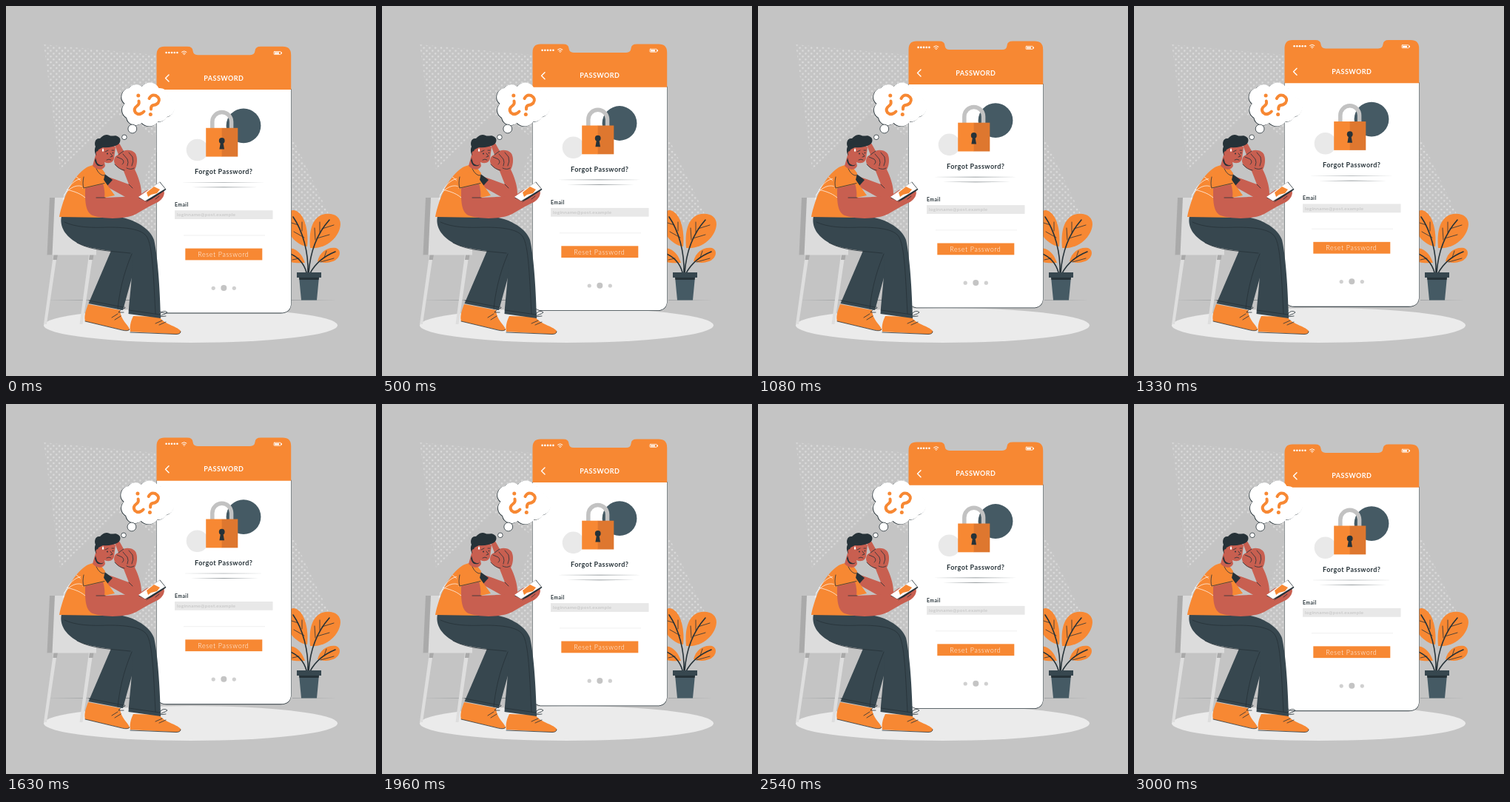
Write an HTML page that moves like this. It is 500 px wide and 500 px high and loops after 3.04 s.

```html
<!DOCTYPE html>
<html lang="en">
<head>
<meta charset="utf-8">
<title>Forgot password</title>
<style>
  html, body { margin: 0; width: 100%; height: 100%; overflow: hidden; background: #c4c4c4; }
  svg { display: block; width: 100vw; height: 100vh; }
  text { font-family: Lato, "Open Sans", sans-serif; letter-spacing: .45px; }
  .bold { font-weight: 700; }
  .orange { fill: #f78833; }
  .white { fill: #fff; }
  .dark { fill: #263238; }
  .slate { fill: #455a64; }
  .pants { fill: #37474f; }
  .skin { fill: #c85f50; }
  .line { fill: none; stroke: #263238; stroke-width: .8; stroke-linecap: round; stroke-linejoin: round; }
  .stem { stroke-width: 1.6; }
  .light { fill: none; stroke: #fff; stroke-width: .7; }
</style>
</head>
<body>
<svg viewBox="0 0 500 500" xmlns="http://www.w3.org/2000/svg">
  <defs>
    <pattern id="dots" width="7.8" height="7.8" patternUnits="userSpaceOnUse">
      <g fill="#dcdcdc"><circle cx="2" cy="2" r="1.3"/><circle cx="5.9" cy="5.9" r="1.3"/></g>
    </pattern>
    <path id="cloud" d="M160 132A12 12 0 0 1 165.500 111A12 12 0 0 1 183 109A13.500 13.500 0 0 1 206 111A11 11 0 0 1 218.500 123A14 14 0 0 1 217 150A12 12 0 0 1 205 156A14 14 0 0 1 183 158A12.500 12.500 0 0 1 162.500 151A12 12 0 0 1 160 132Z"/>
  </defs>

  <rect width="500" height="500" fill="#c4c4c4"/>
  <path fill="url(#dots)" d="M51 52L340 79L437 283L385 302L165 305L205 178L150 146L73 221Z"/>
  <path class="dark" opacity=".7" d="M52 397.500L250 397.100L448 397.500L250 397.900Z"/>
  <ellipse cx="249.5" cy="431.5" rx="198.5" ry="23.5" fill="#ebebeb"/>

  <g id="plant">
    <path class="orange" d="M407 325C395 324 379 310 378 292C378 278 386 273 394 278C405 285 409 307 407 325Z"/>
    <path class="orange" d="M411 327C409 305 413 288 427 282C440 278 452 283 452 295C451 312 433 329 411 327Z"/>
    <path class="orange" d="M421 345C424 332 435 325 446 327C454 330 452 341 442 345C434 348 427 347 421 345Z"/>
    <path class="orange" d="M404 347C397 347 386 349 377 342C371 334 378 325 388 328C396 331 401 338 404 347Z"/>
    <path class="line stem" d="M408 361C409 333 401 304 388 285M409 361C411 332 421 307 437 289M411 361C419 346 430 338 445 332M406 360C402 346 393 338 382 334"/>
    <path class="line" d="M403 313L389 305M400 304L400 292M395 296L386 293M418 316L417 300M424 306L424 292M420 314L437 309M427 301L443 296M425 346L443 341M430 340L433 331M396 341L387 343"/>
    <path class="slate" d="M396 366H423L420 397.500H399Z"/>
    <path class="pants" d="M393 360H426V367H393Z"/>
    <path class="dark" d="M396 367H423L422.500 370H396.500Z"/>
  </g>

  <g id="phone">
    <path class="dark" d="M203.500 112H385.600V401Q385.600 415.400 371 415.400H217Q203.400 415.400 203.400 401Z"/>
    <path class="white" d="M203.800 112H385.200V401Q385.200 414.600 371 414.600H217Q203.800 414.600 203.800 401Z"/>
    <path class="orange" d="M203.500 113V66Q203.500 54.700 214 54.700H245Q252 54.700 252.500 60.500Q253 66.200 259 66.200H330Q336 66.200 336.500 60.500Q337 54.700 344 54.700H374Q385.200 54.700 385.200 66V113Z"/>
    <g id="signal" class="white"></g>
    <g fill="none" stroke="#fff" stroke-linecap="round" stroke-linejoin="round">
      <path stroke-width="1" d="M237.500 62.200Q240.700 59.500 243.900 62.200M239 64Q240.700 62.600 242.400 64"/>
      <rect x="362" y="61.500" width="9.500" height="4" rx=".8" stroke-width=".8"/>
      <path stroke-width="1.400" d="M220 93L215.500 97.500L220 102"/>
    </g>
    <path class="white" d="M363 62.500H369V64.700H363ZM372 62.500H373V64.500H372ZM240 65H241.400V66H240Z"/>
    <text class="bold white" x="267.300" y="100.700" font-size="9">PASSWORD</text>

    <circle class="slate" cx="321" cy="161.800" r="23.400"/>
    <circle cx="258.500" cy="194.500" r="14.800" fill="#e9e9e9"/>
    <path fill="none" stroke="#c2c2c2" stroke-width="5.500" d="M278.800 166V156.500A12.900 12.900 0 0 1 304.600 156.500V166"/>
    <path class="orange" d="M270.200 164.800H292V203.600H270.200Z"/>
    <path fill="#de772f" d="M291.700 164.800H313.300V203.600H291.700Z"/>
    <circle class="dark" cx="291.700" cy="182" r="3.900"/>
    <path class="dark" d="M290.200 183H293.200L295 193.500H288.400Z"/>

    <text class="bold dark" x="255" y="227" font-size="9">Forgot Password?</text>
    <path class="dark" opacity=".65" d="M236 238.200L294 237.900L351 238.200L294 238.500ZM250 244.900L294 244.500L341 244.900L294 245.300Z"/>
    <text class="bold dark" x="228" y="271" font-size="6.800">Email</text>
    <rect x="228" y="276.200" width="132.500" height="11.800" fill="#e8e8e8"/>
    <text x="231" y="284.500" font-size="6.500" fill="#c0c0c0" style="letter-spacing:.3px">loginname@post.example</text>
    <path stroke="#ececec" stroke-width=".8" d="M240 310H350"/>
    <rect class="orange" x="242.300" y="327.600" width="104" height="15.800"/>
    <text class="white" x="259.300" y="338.800" font-size="9" font-weight="300" style="letter-spacing:.6px">Reset Password</text>
    <g fill="#d0d0d0">
      <circle cx="280.200" cy="381.300" r="2.600"/><circle cx="308.300" cy="381.300" r="2.600"/>
      <circle cx="294.300" cy="381.100" r="4" fill="#c4c4c4"/>
    </g>
  </g>

  <g id="thought">
    <use href="#cloud" class="dark" transform="translate(-.8 .5)"/>
    <use href="#cloud" class="white"/>
    <g fill="none" stroke="#f78833" stroke-width="4" stroke-linecap="round" stroke-linejoin="round">
      <path d="M179 128.500Q180 133 176.500 135Q171 139 174.500 144Q180 149 186 142.500"/>
      <path d="M193 125Q196 119 202 121Q209 125 205 131Q202 134 198.500 134Q195 135 195.500 139.500"/>
    </g>
    <circle class="orange" cx="178.300" cy="121" r="2.500"/>
    <circle class="orange" cx="194.800" cy="146.500" r="2.500"/>
    <g class="white" stroke="#263238" stroke-width=".8">
      <circle cx="170.300" cy="166" r="5.900"/><circle cx="159.400" cy="177.300" r="3.300"/>
    </g>
  </g>

  <g id="chair">
    <path fill="#dedede" d="M64 336H69L55 430H51ZM112 336H117.500L103.500 430H99.500Z"/>
    <path fill="#a9a9a9" d="M64.500 336H70L68.700 343H63.500ZM113 336H118.500L117.500 343H112Z"/>
    <path fill="#dcdcdc" d="M60 259H101L122 310V336.500H56Z"/>
    <path fill="#aaa" d="M59 259H66L62.500 336.500H55.500Z"/>
  </g>

  <g id="man">
    <path class="orange" d="M111 403C108 411 105 419 107 426L156 437.500Q166 440 167 437C165 430 155 425 154 411Z"/>
    <path class="line" d="M107 426L157 438Q165 440 167 437M143 421L151 416M147 424L155 419M152 409C154 403 160 405 161 408C157 409 154 411 152 414L159 414"/>
    <path class="pants" d="M144 326L111.500 402L158 411L180 331Z"/>
    <path class="orange" d="M172 419C168 427 167 434 168 440L230 443.500Q237 443 236 439C230 432 215 431 207 420Z"/>
    <path class="line" d="M168 441L230 443.500Q236 443.500 236 440M202 429L211 425M207 431L216 427M207 420C208 412 215 411 218 414C215 417 210 417 207 420L216 419"/>
    <path class="pants" d="M75 284C72 298 80 311 96 320C112 329 145 331 170 334C172 362 167 390 165.500 416L209 422C208 380 205 338 200 316C195 301 174 288 152 285Z"/>
    <path class="line" d="M96 320C116 331 142 331 168 334M170 335C158 363 153 389 151 409M188 309C198 316 199 360 202 416M112 398L158 407M166 411L208 417M79 292C94 299 114 300 138 299C165 299 181 302 188 309"/>

    <path class="skin" d="M132 229L147 234L166 241L159 223C153 220 147 216 146 210C146 205 148 202 152 201L147 188C148 184 152 184 154 187L159 196C165 193 175 196 176 202C178 207 177 216 174 221C179 231 183 243 183 254C182 262 172 262 163 259L136 244Z"/>
    <path class="line" d="M152 201L159 196M150 204L157 207Q161 211 157 214M158 200L164 207Q166 211 164 216M166 198L171 204Q173 210 170 216M147 214Q153 221 160 222M163 219Q169 222 173 219M166 241L171 246"/>
    <path class="dark" d="M132 226L144 235L136 244L129 238Z"/>

    <path class="orange" d="M105 221C112 215 120 214 126 215L134 226L132 235L147 256L133 259L134 286L72 285C76 265 86 236 105 221Z"/>
    <path class="skin" d="M122 198L117 216C124 223 132 222 134 216L133 211C140 214 145 211 146 206L148 191L139 183L126 187Z"/>
    <path class="dark" d="M121 205L123 212Q128 218 133 213L130 216Q122 218 120 209Z"/>
    <path class="dark" d="M122 202L125 194L131 191C138 192 145 190 150 188C155 186 156 179 152 177C148 173 143 177 140 175C134 172 130 176 127 179C120 178 119 186 121 190C119 194 120 199 122 202Z"/>
    <circle class="skin" cx="124.500" cy="199" r="3"/>
    <path class="line" d="M134 197L138 195M143 195L146 195M141 199L144 203L141 204M136 208Q139 206 142 208"/>
    <circle class="dark" cx="137" cy="199.500" r=".9"/><circle class="dark" cx="144.500" cy="198.500" r=".8"/>
    <path class="white" d="M131 192Q133.500 196 131 197Q128.700 196 131 192Z"/>

    <path class="light" d="M77 262C82 244 95 229 111 234M82 248C89 250 99 252 107 259M78 256C92 237 106 243 108 248M95 231Q106 238 104 247"/>
    <path class="skin" d="M107 245L131 240C133 247 134 253 133 259C147 258 166 258 180 256L190 249C195 247 201 248 206 252L213 249C215 254 212 261 205 265C194 270 185 276 176 281C161 289 129 288 117 283C106 278 107 260 107 245Z"/>
    <path class="orange" d="M105 225C98 231 101 240 104 247L134 240L128 224Z"/>
    <path class="line" d="M105 231Q103 240 105 246L133 239.500M134 259L122 259M122 220Q127 230 133 229"/>
    <path class="dark" d="M179 259L208 237.500L216.500 248L190 265.500L187 263Z"/>
    <path class="white" d="M179 258L207.500 238L215 247L188 263.500Z"/>
    <path class="orange" d="M190 252L200 244L208 248L204 253L196 255L192 258Z"/>
    <path class="skin" d="M187 264L202 260C207 258 209 252 213 250C215 254 212 261 205 265L191 270Z"/>
    <path class="line" d="M190 264.500L214 249.500M202 261L207 257"/>
  </g>
</svg>

<script>
  const LOOP = 3040, RISE = 10, SWAY = 0.5;
  const phone = document.getElementById('phone');
  const thought = document.getElementById('thought');

  document.getElementById('signal').innerHTML = Array.from({ length: 5 },
    (_, i) => `<circle cx="${216.6 + i * 3.7}" cy="63" r="1.3"/>`).join('');

  const moveTo = (part, x, y) => part.setAttribute('transform', `translate(${x.toFixed(3)} ${y.toFixed(3)})`);

  function draw(time) {
    const phase = (time % LOOP) / LOOP;
    // The phone rises and sinks at constant speed.
    const lift = 1 - Math.abs(1 - 2 * phase);
    moveTo(phone, 0, -RISE * lift);
    moveTo(thought, SWAY * Math.cos(phase * 6 * Math.PI), 0);
  }

  const start = performance.now();
  function tick() {
    draw(performance.now() - start);
    requestAnimationFrame(tick);
  }
  draw(0);
  requestAnimationFrame(tick);
</script>
</body>
</html>
```
